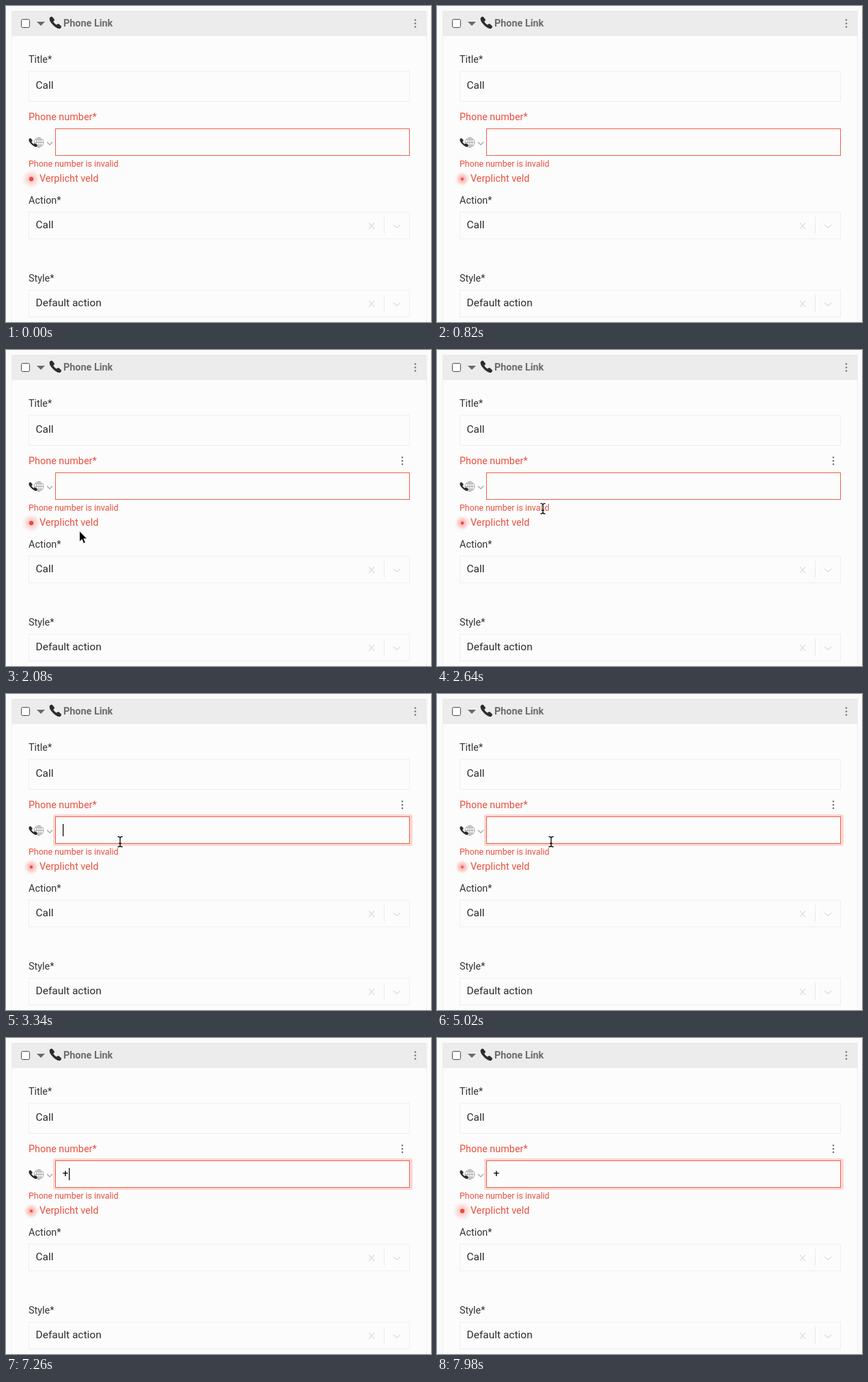
Write an HTML page that moves like this. It is 622 px wide and 462 px high and loops after 8000 ms.

```html
<!DOCTYPE html>
<html lang="en">
<head>
<meta charset="utf-8">
<title>Phone link form</title>
<style>
  html, body { margin: 0; width: 100%; height: 100%; overflow: hidden; background: #fbfbfb; }
  svg { display: block; width: 622px; height: 462px; }
  text { font: 14.4px Roboto, sans-serif; fill: #333; }
  .value { font-size: 15.5px; fill: #2b2b2b; }
  .bold { font-weight: 700; fill: #6c6c6c; }
  .error { fill: #e8503e; }
  .small { font-size: 12.4px; }
  .line { fill: none; stroke: #ebebf0; }
  .box { fill: #fcfcfc; stroke: #efeff4; }
  .ink { fill: #2d2d2d; }
</style>
</head>
<body>
<svg viewBox="0 0 622 462">
  <defs>
    <radialGradient id="halo">
      <stop offset="0" stop-color="#f4584c" stop-opacity=".6"/>
      <stop offset=".4" stop-color="#f4584c" stop-opacity=".4"/>
      <stop offset=".75" stop-color="#f4584c" stop-opacity=".13"/>
      <stop offset="1" stop-color="#f4584c" stop-opacity="0"/>
    </radialGradient>
    <path id="handset" d="M1 2 Q3 -.5 5 1 L8 5 Q8.500 6.500 6 7.500 Q8 11 11 12.500 Q12.500 10.500 14 11 L17.500 14 Q19 16 16 18 Q12 19 6 13 Q-1 6 1 2Z"/>
    <g id="kebab"><circle cy="-5" r="1.300"/><circle r="1.300"/><circle cy="5" r="1.300"/></g>
    <g id="select">
      <rect class="box" x="33.500" y=".5" width="557" height="39"/>
      <path class="line" d="M553.500 7V32"/>
      <path class="line" stroke-width="1.400" style="stroke:#dedee4" d="M531 16l8 9m0-9l-8 9M567 19l5 4 5-4"/>
    </g>
    <path id="ibeam" d="M-3.500-7.500Q0-7.500 0-5.500Q0-7.500 3.500-7.500M0-6V6M-3.500 7.500Q0 7.500 0 5.500Q0 7.500 3.500 7.500M-2 2.500H2"/>
  </defs>

  <rect class="box" x="8.500" y="7.500" width="607" height="470"/>
  <rect x="8" y="7" width="608" height="37" fill="#ececec"/>
  <rect x="22.500" y="19.500" width="12" height="12" rx="2" fill="#fff" stroke="#4c4c4c"/>
  <path d="M45 23h12l-6 6z" fill="#6a6a60"/>
  <use href="#handset" class="ink" x="63" y="15"/>
  <text class="bold" x="84" y="30">Phone Link</text>
  <use href="#kebab" x="599" y="25.500" fill="#777"/>

  <text x="33" y="83">Title*</text>
  <rect class="box" x="33.500" y="95.500" width="557" height="44"/>
  <text class="value" x="43.500" y="121">Call</text>

  <text class="error" x="33" y="167">Phone number*</text>
  <use id="menu" href="#kebab" x="580" y="162" fill="#777"/>
  <g fill="none" stroke="#a2a2a2" stroke-width=".9">
    <circle cx="48" cy="199.500" r="7"/>
    <ellipse cx="48" cy="199.500" rx="3.300" ry="7"/>
    <path d="M48 192.500v14M41 199.500h14M42.500 195.500h11M42.500 203.500h11"/>
    <path d="M60 199l4 4 4-4" stroke-width="1.200"/>
  </g>
  <use href="#handset" class="ink" transform="translate(33 193) scale(.72)"/>
  <rect id="ring" x="71" y="178" width="522" height="42" rx="1" fill="none" stroke="#fbd6d0" stroke-width="4"/>
  <rect x="72.500" y="179.500" width="518" height="39" fill="#fcfcfc" stroke="#f0604a"/>
  <text id="typed" class="value" x="82.500" y="203" style="fill:#000">+</text>
  <rect id="caret" y="190" width="1.200" height="18"/>

  <text class="error small" x="33" y="235">Phone number is invalid</text>
  <circle id="glow" cx="37" cy="253" fill="url(#halo)"/>
  <circle id="dot" cx="37" cy="253" fill="#f0483c"/>
  <text class="error" x="49" y="257">Verplicht veld</text>

  <text x="33" y="289">Action*</text>
  <use href="#select" y="301"/>
  <rect id="hover" x="33.500" y="301.500" width="557" height="39" fill="none" stroke="#d2d2d2"/>
  <text class="value" x="43.500" y="325">Call</text>

  <text x="33" y="403">Style*</text>
  <use href="#select" y="415"/>
  <text class="value" x="43.500" y="439">Default action</text>

  <path id="arrow" d="M0 0V15.500L3.600 12.200 6 18 8.700 16.800 6.300 11.300H11Z" fill="#000" stroke="#fff" stroke-width=".8"/>
  <g id="beam" fill="none">
    <use href="#ibeam" stroke="#fff" stroke-width="3"/>
    <use href="#ibeam" stroke="#000" stroke-width="1.300"/>
  </g>
</svg>
<script>
const LOOP = 8000, FOCUS = 3080, TYPE = 6100, PULSE = 2000;

// Pointer path: time, x, y
const path = [
  [1100, -14, 345], [1300, 20, 318], [1500, 52, 306], [1660, 52, 306],
  [1900, 75, 290], [2150, 120, 255], [2400, 152, 234], [2640, 155, 232],
  [2800, 160, 224], [2960, 167, 216]
];
const $ = id => document.getElementById(id);
const show = (id, on) => $(id).setAttribute('visibility', on ? 'visible' : 'hidden');

function pointerAt(t) {
  const i = path.findIndex(p => p[0] > t);
  if (i === 0) return path[0].slice(1);
  if (i < 0) return path[path.length - 1].slice(1);
  const [t0, x0, y0] = path[i - 1], [t1, x1, y1] = path[i];
  const k = (t - t0) / (t1 - t0);
  return [x0 + (x1 - x0) * k, y0 + (y1 - y0) * k];
}

function draw(t) {
  const [x, y] = pointerAt(t);
  const visible = t >= 1100 && t < TYPE;
  const typed = t >= TYPE, focused = t >= FOCUS;
  const overText = y < 243;
  for (const id of ['arrow', 'beam']) {
    $(id).setAttribute('transform', `translate(${x} ${y})`);
    show(id, visible && (id === 'beam') === overText);
  }
  show('hover', visible && x > 33 && y > 301 && y < 341);
  show('menu', y < 268);
  show('ring', focused);
  show('typed', typed);
  show('caret', focused && (t - (typed ? TYPE : FOCUS)) % 1000 < 500);
  $('caret').setAttribute('x', typed ? 92 : 83);

  // The halo spreads and fades while the dot grows
  const swell = (1 + Math.cos(t / PULSE * 2 * Math.PI)) / 2;
  $('glow').setAttribute('r', 10.5 + 3.5 * swell);
  $('glow').setAttribute('opacity', 0.9 - 0.3 * swell);
  $('dot').setAttribute('r', 1.8 + 1.4 * swell);
}

const start = performance.now();
function tick() {
  draw((performance.now() - start) % LOOP);
  requestAnimationFrame(tick);
}
tick();
</script>
</body>
</html>
```
